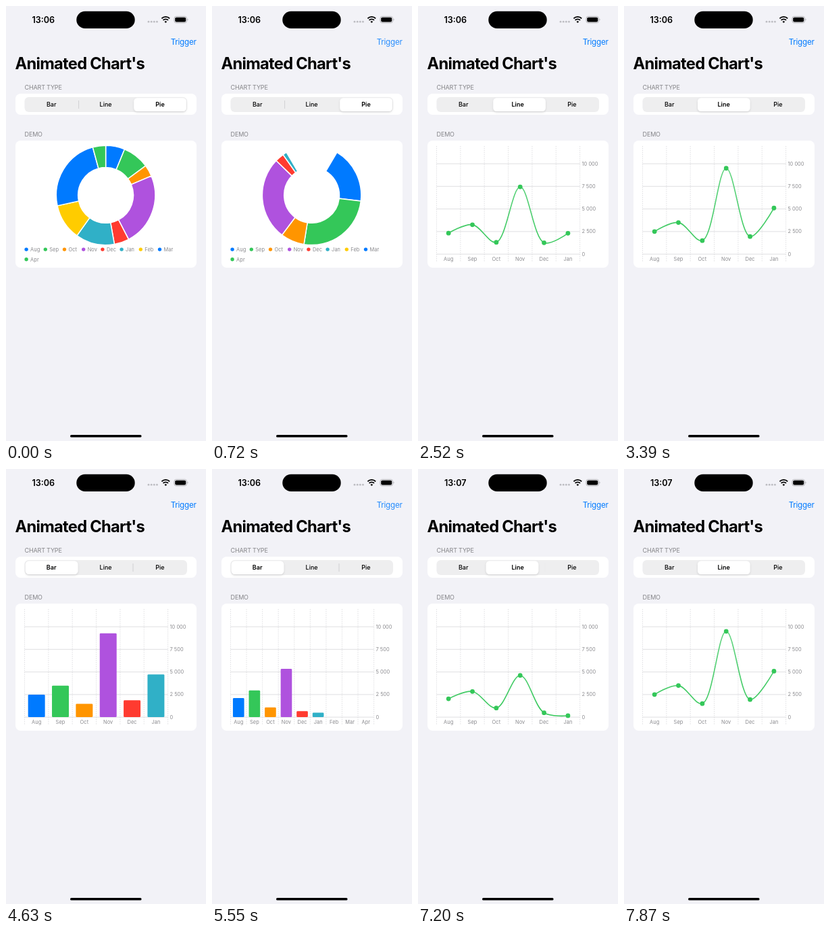
An HTML page that plays this animation: 296 px wide and 640 px high, repeating every 7.99 s.

```html
<!DOCTYPE html>
<html lang="en">
<head>
<meta charset="utf-8">
<title>Animated charts</title>
<style>
  html, body { margin: 0; width: 100%; height: 100%; overflow: hidden; background: #f2f2f7; }
  svg { display: block; width: 296px; height: 640px; font-family: Inter, "Open Sans", sans-serif; }
  .clock { font-size: 12.6px; font-weight: 600; letter-spacing: 0; text-anchor: middle; }
  .title { font-size: 23.7px; font-weight: 700; letter-spacing: -.74px; }
  .trigger { font-size: 11.6px; fill: #007aff; letter-spacing: -.22px; text-anchor: end; }
  .head { font-size: 9px; fill: #858589; letter-spacing: -.18px; }
  .tab { font-size: 9px; font-weight: 500; text-anchor: middle; }
  .tab.on { font-weight: 600; }
  .small { font-size: 7.4px; fill: #8a8a8e; letter-spacing: .08px; }
  .mid { text-anchor: middle; }
  .grid { stroke: #d8d8db; stroke-width: .8; fill: none; }
  .dash { stroke-dasharray: 1.5 1.5; }
</style>
</head>
<body>
<svg viewBox="0 0 296 640">
  <defs>
    <linearGradient id="fade" gradientUnits="userSpaceOnUse" x1="0" y1="239" x2="0" y2="365">
      <stop offset="0" stop-color="#62d481"/>
      <stop offset="1" stop-color="#34c759"/>
    </linearGradient>
    <filter id="shadow" x="-20%" y="-40%" width="140%" height="200%">
      <feDropShadow dx="0" dy="1.5" stdDeviation="1.8" flood-opacity=".13"/>
    </filter>
  </defs>
  <rect width="296" height="640" fill="#f2f2f7"/>

  <text class="clock" id="clock" x="55.3" y="24.5"></text>
  <rect x="104.3" y="7.8" width="86.4" height="25.2" rx="12.6"/>
  <g fill="#bdbdc2">
    <circle cx="211" cy="23.2" r="1.4"/><circle cx="215.2" cy="23.2" r="1.4"/>
    <circle cx="219.3" cy="23.2" r="1.4"/><circle cx="223.4" cy="23.2" r="1.4"/>
  </g>
  <g fill="none" stroke="#000" stroke-width="1.9">
    <path d="M230.4 18.4a8.2 8.2 0 0 1 11.8 0"/>
    <path d="M232.6 20.9a5.2 5.2 0 0 1 7.4 0"/>
    <path d="M236.3 24.6l-1.4-1.5a2 2 0 0 1 2.8 0z" fill="#000" stroke-width=".8"/>
  </g>
  <rect x="248.9" y="15.4" width="18.6" height="9.4" rx="3" fill="none" stroke="#a5a5a9" stroke-width=".8"/>
  <rect x="250.2" y="16.7" width="16" height="6.8" rx="1.9"/>
  <path d="M268.6 18.6v3a1.7 1.7 0 0 0 0-3z" fill="#a5a5a9"/>

  <text class="trigger" id="trigger" x="281.6" y="56.6">Trigger</text>
  <text class="title" x="13.6" y="92.5">Animated Chart's</text>

  <text class="head" x="27.6" y="123">CHART TYPE</text>
  <rect x="14" y="129" width="268" height="31" rx="7.5" fill="#fff"/>
  <rect x="27.5" y="134" width="240.5" height="22" rx="6.2" fill="#eeeeef"/>
  <path class="split" d="M107.6 139v12" stroke="#c8c8cc" stroke-width=".8"/>
  <path class="split" d="M188 139v12" stroke="#c8c8cc" stroke-width=".8"/>
  <rect id="thumb" y="135.2" width="77.6" height="19.7" rx="5.2" fill="#fff" filter="url(#shadow)"/>
  <text class="tab" x="67.2" y="148.3">Bar</text>
  <text class="tab" x="147.6" y="148.3">Line</text>
  <text class="tab" x="228" y="148.3">Pie</text>

  <text class="head" x="27.6" y="192">DEMO</text>
  <rect x="14" y="198" width="268" height="187" rx="7.5" fill="#fff"/>
  <g id="chart"></g>
  <rect x="95" y="630.9" width="105.6" height="3.7" rx="1.85"/>
</svg>
<script>
const LOOP = 7990, LEAD = 35, CLOCK_TICK = 5750;
const BAR = 0, LINE = 1, PIE = 2;
const BLUE = '#007aff', GREEN = '#34c759';
const colors = [BLUE, GREEN, '#ff9500', '#af52de', '#ff3b30', '#30b0c7', '#ffcc00', BLUE, GREEN];
const months = 'Aug Sep Oct Nov Dec Jan Feb Mar Apr'.split(' ');
const values = [2500, 3500, 1500, 9500, 1950, 5100, 4700, 9700, 1700];
const scenes = [
  { at: -9000, type: PIE, count: 9 },
  { at: 500, type: PIE, count: 9, tap: true },
  { at: 2210, type: LINE, count: 6 },
  { at: 4100, type: BAR, count: 6 },
  { at: 5320, type: BAR, count: 9, tap: true },
  { at: 6990, type: LINE, count: 6 }
];
const left = 27.5, right = 239.6, ceiling = 206, base = 365.1, scale = .0133;

const byId = id => document.getElementById(id);
const tabs = document.querySelectorAll('.tab');
const splits = document.querySelectorAll('.split');
const n = v => v.toFixed(2);

// Critically damped spring from 0 to 1; t in seconds
function spring(t, response = .5) {
  const x = Math.max(0, t) * 2 * Math.PI / response;
  return 1 - (1 + x) * Math.exp(-x);
}
// The first two values start together, the rest follow at even steps
const delay = i => i < 2 ? 0 : .054 * i - .047;
const grow = (i, t) => spring(t - delay(i));
const sum = k => values.slice(0, k).reduce((a, b) => a + b, 0);

function polar(r, deg) {
  const a = deg * Math.PI / 180;
  return n(147.6 + r * Math.sin(a)) + ' ' + n(278.4 - r * Math.cos(a));
}

function sector(a, b, color) {
  if (b - a < .6) return '';
  const big = b - a > 180 ? 1 : 0, R = 73.2, r = 40.9;
  return `<path d="M${polar(R, a)}A${R} ${R} 0 ${big} 1 ${polar(R, b)}L${polar(r, b)}` +
    `A${r} ${r} 0 ${big} 0 ${polar(r, a)}Z" fill="${color}" stroke="#fff" stroke-width="1.5"/>`;
}

// Each newly shown value retargets every boundary; the springs add up
function boundary(i, count, t) {
  let angle = 180, last = 180;
  for (let k = 0; k < count; k++) {
    const next = 360 * sum(Math.min(i, k + 1)) / sum(k + 1);
    angle += (next - last) * grow(k, t);
    last = next;
  }
  return angle;
}

function pie(count, t) {
  let out = '';
  for (let i = 0; i < count; i++) {
    out += sector(boundary(i, count, t), boundary(i + 1, count, t), colors[i]);
    const x = 30.1 + (i % 8) * 28.2, y = i < 8 ? 358.1 : 372.8;
    out += `<circle cx="${n(x)}" cy="${y}" r="2.7" fill="${colors[i]}"/>` +
      `<text class="small" x="${n(x + 6)}" y="${n(y + 2.7)}">${months[i]}</text>`;
  }
  return out;
}

function axes(count) {
  const step = (right - left) / count;
  let out = '';
  for (let v = 0; v <= 10000; v += 2500) {
    const y = base - v * scale;
    const label = String(v).replace(/(\d)(?=\d{3}$)/, '$1 ');
    out += `<path class="grid" d="M${left} ${n(y)}H${right}"/>` +
      `<text class="small" x="242.4" y="${n(y + 2.6)}">${label}</text>`;
  }
  for (let i = 0; i <= count; i++) {
    const x = left + i * step;
    out += `<path class="grid dash" d="M${n(x)} ${ceiling}V377"/>`;
    if (i < count)
      out += `<text class="small mid" x="${n(x + step / 2)}" y="375">${months[i]}</text>`;
  }
  return out;
}

function bars(count, t) {
  const step = (right - left) / count, w = step * .707;
  let out = axes(count);
  for (let i = 0; i < count; i++) {
    const h = values[i] * scale * grow(i, t);
    out += `<rect x="${n(left + step * (i + .5) - w / 2)}" y="${n(base - h)}" width="${n(w)}" ` +
      `height="${n(h)}" rx="1.4" fill="${colors[i]}"/>`;
  }
  return out;
}

// Centripetal Catmull-Rom as cubic Béziers
function smoothPath(pts) {
  const gap = (a, b) => Math.sqrt(Math.hypot(b[0] - a[0], b[1] - a[1]));
  const slope = i => {
    const p = pts[i], a = pts[i - 1], b = pts[i + 1];
    if (!a || !b) return null;
    const d = gap(a, p), e = gap(p, b);
    return [0, 1].map(c => (p[c] - a[c]) / d - (b[c] - a[c]) / (d + e) + (b[c] - p[c]) / e);
  };
  let d = 'M' + pts[0].map(n);
  for (let i = 0; i < pts.length - 1; i++) {
    const p = pts[i], q = pts[i + 1], g = gap(p, q) / 3, u = slope(i), v = slope(i + 1);
    const c1 = u ? p.map((x, c) => x + u[c] * g) : p;
    const c2 = v ? q.map((x, c) => x - v[c] * g) : q;
    d += 'C' + [...c1, ...c2, ...q].map(n);
  }
  return d;
}

function line(count, t) {
  const step = (right - left) / count;
  const pts = values.slice(0, count).map((v, i) =>
    [left + step * (i + .5), base - v * scale * grow(i, t)]);
  return axes(count) +
    `<path d="${smoothPath(pts)}" fill="none" stroke="url(#fade)" stroke-width="1.6" stroke-linejoin="round"/>` +
    pts.map(p => `<circle cx="${n(p[0])}" cy="${n(p[1])}" r="3.4" fill="${GREEN}"/>`).join('');
}

const draw = [bars, line, pie];

function render(ms) {
  const index = scenes.findLastIndex(s => s.at <= ms);
  const scene = scenes[index], before = scenes[Math.max(0, index - 1)];
  const since = ms - scene.at, t = (since + LEAD) / 1000;

  byId('chart').innerHTML = draw[scene.type](scene.count, t);
  byId('clock').textContent = ms < CLOCK_TICK ? '13:06' : '13:07';

  const dim = scene.tap ? Math.max(0, 1 - since / 450) ** 2 : 0;
  byId('trigger').setAttribute('opacity', n(1 - .6 * dim));

  const pos = before.type + (scene.type - before.type) * spring(t, .4);
  byId('thumb').setAttribute('x', n(28.7 + pos * 80.3));
  tabs.forEach((tab, i) => tab.classList.toggle('on', i === scene.type));
  splits.forEach((s, i) => {
    const away = Math.abs(pos - (i + .5)) - .5;
    s.setAttribute('opacity', n(Math.min(1, Math.max(0, away))));
  });
}

let start;
function frame(now) {
  start ??= now;
  render((now - start) % LOOP);
  requestAnimationFrame(frame);
}
render(0);
requestAnimationFrame(frame);
</script>
</body>
</html>
```
